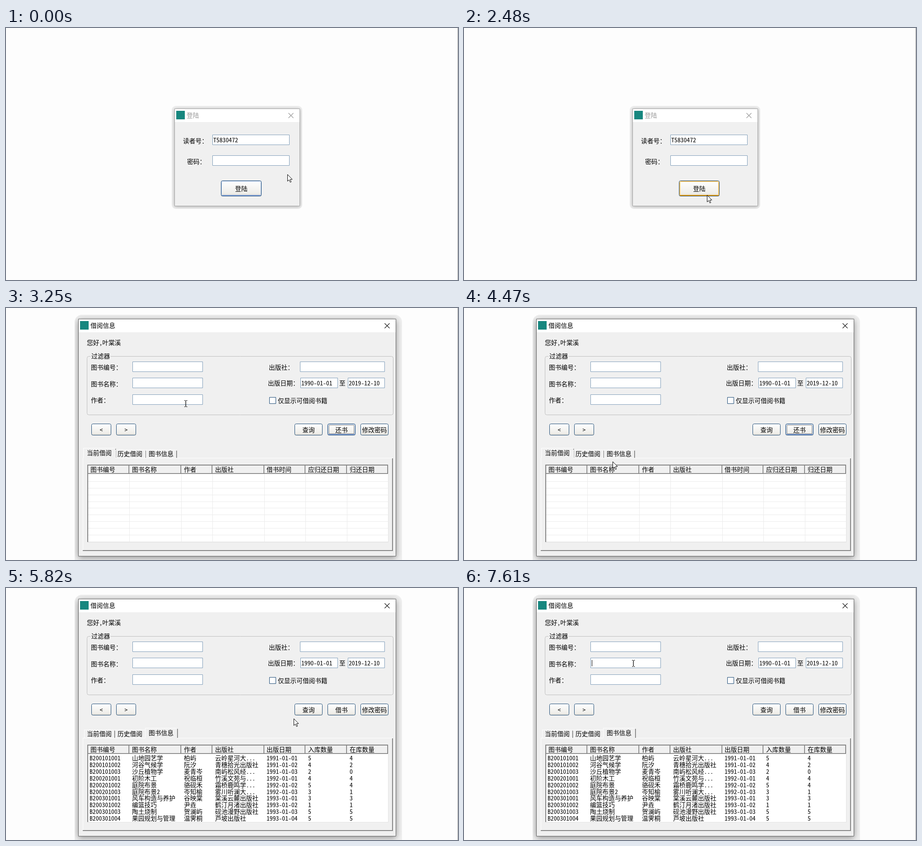
These frames come from a looping animation (1001 px wide and 560 px high, 8 s). An HTML page with a canvas:

```html
<!DOCTYPE html>
<html lang="zh-CN">
<head>
<meta charset="utf-8">
<title>借阅信息</title>
<style>
html, body { margin: 0; width: 100%; height: 100%; overflow: hidden; background: #fdfdfd; }
canvas { display: block; width: 100vw; height: 100vh; }
</style>
</head>
<body>
<canvas id="stage" width="1001" height="560"></canvas>
<script>
const c = document.getElementById('stage').getContext('2d');
const LOOP = 8000;
const FONT = '13.72px "Noto Sans Mono CJK SC", "Noto Sans CJK SC", "Noto Sans CJK", monospace';
const FACE = '#f0f0f0', FLAT = '#f5f5f5', EDGE = '#7f9db9', DARK = '#6f6f6f', NAVY = '#1c4a75';

const READER = 'T5830472';
const GREETING = '您好,叶棠溪';
const LEFT_FIELDS = [119, 155, 192];
const FIELDS = [[651, 119, 188], [652, 155, 83], [757, 155, 82], ...LEFT_FIELDS.map(y => [280, y, 156])];
const COLS = [187, 279, 394, 463, 577, 669, 761];
const SEPS = [272, 387, 456, 571, 662, 754];
const LOAN_HEAD = ['图书编号', '图书名称', '作者', '出版社', '借书时间', '应归还日期', '归还日期'];
const BOOK_HEAD = ['图书编号', '图书名称', '作者', '出版社', '出版日期', '入库数量', '在库数量'];
const BOOKS = `B200101001|山地园艺学|柏屿|云岭星河大...|1991-01-01|5|4
B200101002|河谷气候学|阮汐|青穗拾光出版社|1991-01-02|4|2
B200101003|沙丘植物学|麦青岑|南屿松风经...|1991-01-03|2|0
B200201001|初阶木工|祝临桓|竹溪文苑与...|1992-01-01|4|4
B200201002|庭院布景|骆砚禾|霜桥鹿鸣学...|1992-01-02|5|4
B200201003|庭院布景2|岑知榆|雾川听澜大...|1992-01-03|3|1
B200301001|风车构造与养护|谷映棠|棠溪云麓出版社|1993-01-01|3|3
B200301002|编篮技巧|尹垚|鹤汀月渚出版社|1993-01-02|1|1
B200301003|陶土烧制|贺澜屿|砚池漫野出版社|1993-01-03|5|5
B200301004|果园规划与管理|温霁桐|芦坡出版社|1993-01-04|5|5`.split('\n').map(r => r.split('|'));

// Pointer moves: start, end, number of steps, points passed at equal shares
const MOVES = [
  [270, 930, 6, [[623, 325], [520, 357]]],
  [1930, 2200, 3, [[520, 357], [538, 371]]],
  [2980, 3520, 5, [[538, 371], [322, 126]]],
  [3920, 4330, 4, [[322, 126], [510, 126], [713, 130], [600, 230], [460, 300]]],
  [4470, 4860, 4, [[460, 300], [329, 341], [283, 333], [318, 331], [340, 330]]],
  [5400, 5820, 4, [[340, 330], [637, 290]]],
  [5950, 6370, 4, [[637, 290], [668, 277]]],
  [6800, 7610, 7, [[668, 277], [375, 167]]]
];

function pointer(t) {
  let at = MOVES[0][3][0];
  for (const [start, end, n, pts] of MOVES) {
    if (t < start) break;
    const gap = (end - start) / (n - 1);
    let p = Math.min(n, Math.floor((t - start) / gap + 0.01) + 1) / n;
    if (pts.length === 2) p = p * p * (3 - 2 * p);
    const s = p * (pts.length - 1);
    const i = Math.min(pts.length - 2, Math.floor(s)), f = s - i;
    at = pts[i].map((v, k) => Math.round(v + (pts[i + 1][k] - v) * f));
  }
  return at;
}

const inside = ([px, py], x, y, w, h) => px >= x && px < x + w && py >= y && py < y + h;

function rect(x, y, w, h, color) {
  c.fillStyle = color;
  c.fillRect(x, y, w, h);
}

function outline(x, y, w, h, color, r = 0) {
  c.strokeStyle = color;
  c.lineWidth = 1;
  c.beginPath();
  c.roundRect(x + 0.5, y + 0.5, w - 1, h - 1, r);
  c.stroke();
}

function text(s, x, y, color = '#000', align = 'left') {
  c.font = FONT;
  c.textAlign = align;
  c.fillStyle = color;
  c.fillText(s, x, y + 5);
}

function field(x, y, w, value = '', fill = '#fff') {
  rect(x, y, w, 23, fill);
  outline(x, y, w, 23, EDGE);
  text(value, x + 2, y + 11.5);
}

function button(label, x, y, w, h, { hot, focus, main } = {}) {
  const g = c.createLinearGradient(0, y, 0, y + h);
  g.addColorStop(0, '#ffffff');
  g.addColorStop(0.8, '#efeeea');
  g.addColorStop(1, '#dcd8d0');
  c.fillStyle = g;
  c.beginPath();
  c.roundRect(x, y, w, h, 3);
  c.fill();
  if (hot) {
    outline(x + 1, y + 1, w - 2, h - 2, '#f8c868', 2);
    outline(x + 2, y + 2, w - 4, h - 4, '#f5c05a', 1);
    rect(x + 2, y + h - 3, w - 4, 2, '#e59700');
  } else if (main) {
    outline(x + 1, y + 1, w - 2, h - 2, '#a9c3ea', 2);
    rect(x + 2, y + h - 3, w - 4, 2, '#7f9fd8');
  }
  outline(x, y, w, h, NAVY, 3);
  if (focus) {
    c.setLineDash([1, 1]);
    outline(x + 3, y + 3, w - 6, h - 6, '#222');
    c.setLineDash([]);
  }
  text(label, x + w / 2, y + h / 2 + 0.5, '#000', 'center');
}

// Clipped soft shadow and window faces
function backing([x, y, w, h], [l, t, r, b], { active, flat, radius }) {
  const box = [x - l, y - t, w + l + r, h + t + b];
  c.save();
  c.beginPath();
  c.roundRect(...box, flat ? 0 : radius);
  c.clip();
  rect(...box, flat ? '#f7f7f7' : '#f1f1f1');
  c.shadowColor = active ? 'rgba(0,0,0,.42)' : 'rgba(0,0,0,.3)';
  c.shadowBlur = active ? 13 : 7;
  c.shadowOffsetY = active ? 3 : 1;
  rect(x, y, w, h, FACE);
  c.restore();
  rect(x, y, w, h, flat ? FLAT : FACE);
  rect(x, y, w, 30, flat ? FLAT : '#fff');
}

// Window with border, icon, title and close mark
function shell(title, box, margin, { active = true, flat, ghost, radius = 16 } = {}) {
  const [x, y, w, h] = box;
  if (ghost) outline(x, y, w, 31, '#999');
  else backing(box, margin, { active, flat, radius });
  outline(x, y, w, h, active ? '#626262' : '#a5a5a5');
  rect(x + 4, y + 5, 19, 19, '#17877f');
  text(title, x + 27, y + 15, active ? '#000' : '#999');
  const cx = x + w - 20, cy = y + 15.5;
  c.strokeStyle = active ? '#1a1a1a' : '#999';
  c.lineWidth = 1.1;
  c.beginPath();
  c.moveTo(cx - 5.5, cy - 5.5);
  c.lineTo(cx + 5.5, cy + 5.5);
  c.moveTo(cx + 5.5, cy - 5.5);
  c.lineTo(cx - 5.5, cy + 5.5);
  c.stroke();
}

function login(t, at, ghost) {
  const active = t >= 1210 && t < 2480;
  shell('登陆', [373, 179, 278, 217], active ? [9, 9, 12, 13] : [6, 6, 5, 6],
    { active, ghost, radius: active ? 16 : 9 });
  text('读者号：', 392, 250.5);
  text('密码：', 401, 297);
  field(457, 237, 171, READER);
  field(457, 283, 171);
  button('登陆', 476, 339, 90, 35, { hot: inside(at, 476, 339, 90, 35), focus: active, main: !ghost });
}

function tabs(selected) {
  const labels = ['当前借阅', '历史借阅', '图书信息'];
  rect(170, 333, 687, 1, '#fff');
  rect(170, 333, 1, 206, '#fff');
  rect(855, 334, 2, 206, '#858585');
  rect(170, 538, 687, 2, '#858585');
  const lefts = [173, 242, 310], rights = [240, 309, 377];
  labels.forEach((label, i) => {
    const on = i === selected, x = lefts[i] - on * 2, end = rights[i] + on * 2;
    const top = on ? 311 : 315;
    if (on) rect(x, top, end - x, 24, FACE);
    rect(x, top, 1, 333 - top, '#fff');
    rect(x + 1, top, end - x - 2, 1, '#fff');
    if (i !== selected - 1) rect(end, top + 2, 1.5, 331 - top, DARK);
    text(label, [179, 247, 316][i], on ? 322 : 324);
  });
}

function list(head, rows, flat) {
  rect(180, 348, 667, 173, flat ? FLAT : '#fff');
  rect(180, 348, 667, 2, '#858585');
  rect(180, 348, 2, 172, '#858585');
  rect(180, 520, 667, 1, '#e3e3e3');
  rect(846, 348, 1, 172, '#e3e3e3');
  rect(182, 350, 664, 18, flat ? FLAT : FACE);
  rect(182, 367, 664, 1.5, DARK);
  [...SEPS, 845].forEach(x => rect(x - 0.5, 350, 1.5, 18, DARK));
  head.forEach((s, i) => text(s, COLS[i], 359));
  if (flat) return;
  c.save();
  c.beginPath();
  c.rect(182, 369, 664, 151);
  c.clip();
  if (rows) {
    rows.forEach((row, r) => row.forEach((s, i) => text(s, COLS[i] - (i ? 0 : 2), 378 + r * 14.9)));
  } else {
    SEPS.forEach(x => rect(x + 1, 369, 1, 151, '#ebebeb'));
    for (let i = 0; i < 10; i++) rect(182, Math.round(385 + i * 14.87), 664, 1, '#ebebeb');
  }
  c.restore();
}

function library(t, at, flat) {
  const books = t >= 5000;
  const fill = flat ? FLAT : '#fff';
  shell('借阅信息', [160, 24, 704, 528], [8, 9, 13, 24], { flat });
  text(GREETING, 179, 77);
  outline(179, 107, 679, 131, '#bdbdbd', 4);
  rect(187, 104, 45, 8, flat ? FLAT : FACE);
  text('过滤器', 189, 107);
  ['图书编号：', '图书名称：', '作者：'].forEach((s, i) => text(s, 188, 132 + i * 36.6));
  LEFT_FIELDS.forEach(y => field(280, y, 156, '', fill));
  text('出版社：', 582, 132);
  text('出版日期：', 580, 166.5);
  field(651, 119, 188, '', fill);
  field(652, 155, 83, '1990-01-01', fill);
  text('至', 738, 166.5);
  field(757, 155, 82, '2019-12-10', fill);
  rect(583, 198, 15, 15, fill);
  outline(583, 198, 15, 15, NAVY);
  text('仅显示可借阅书籍', 602, 205.5);

  button('<', 189, 257, 44, 26);
  button('>', 244, 257, 44, 26);
  button('查询', 639, 257, 62, 26, { hot: inside(at, 639, 257, 62, 26), focus: t >= 6520 && t < 7610 });
  button(books ? '借书' : '还书', 712, 257, 62, 26, { main: !books, focus: !books });
  button('修改密码', 785, 257, 62, 26);

  tabs(books ? 2 : 0);
  list(books ? BOOK_HEAD : LOAN_HEAD, t >= 5130 ? BOOKS : null, flat);
  if (t >= 7610) rect(283, 160, 1, 14, '#000');
}

function layer(scale, alpha, blend, paint) {
  c.save();
  c.globalAlpha = alpha;
  c.globalCompositeOperation = blend;
  c.translate(350, 170);
  c.scale(scale, scale);
  c.translate(-350, -170);
  paint();
  c.restore();
}

// The list window grows in while the login window fades
function opening(t, at) {
  const early = t < 2720;
  if (early) layer(1, 0.6, 'source-over', () => login(t, [0, 0]));
  layer(early ? 0.975 : 0.994, early ? 0.5 : 0.93, 'source-over', () => library(t, at, true));
  if (!early) layer(1, 0.13, 'multiply', () => login(t, [0, 0], true));
}

function cursor([x, y], beam) {
  if (beam) {
    rect(x - 0.5, y - 6, 1.3, 13, '#000');
    for (const dy of [-7, 7]) {
      rect(x - 3, y + dy, 2.5, 1, '#000');
      rect(x + 1, y + dy, 2.5, 1, '#000');
    }
    return;
  }
  c.beginPath();
  [[0, 0], [0, 15], [3.4, 11.9], [6, 17.4], [8.2, 16.4], [5.8, 11], [10.4, 10.8]]
    .forEach(([dx, dy]) => c.lineTo(x + 0.5 + dx, y + 0.5 + dy));
  c.closePath();
  c.fillStyle = '#fff';
  c.fill();
  c.strokeStyle = '#000';
  c.lineWidth = 1;
  c.stroke();
}

function draw(t) {
  const at = pointer(t);
  rect(0, 0, 1001, 560, '#fdfdfd');
  rect(1000, 0, 1, 560, '#a0a0a0');
  if (t < 2600) login(t, at);
  else if (t < 2860) opening(t, at);
  else library(t, at, false);
  cursor(at, t >= 2860 && FIELDS.some(([x, y, w]) => inside(at, x, y, w, 23)));
}

const begin = performance.now();
function tick() {
  draw((performance.now() - begin) % LOOP);
  requestAnimationFrame(tick);
}
tick();
</script>
</body>
</html>
```
